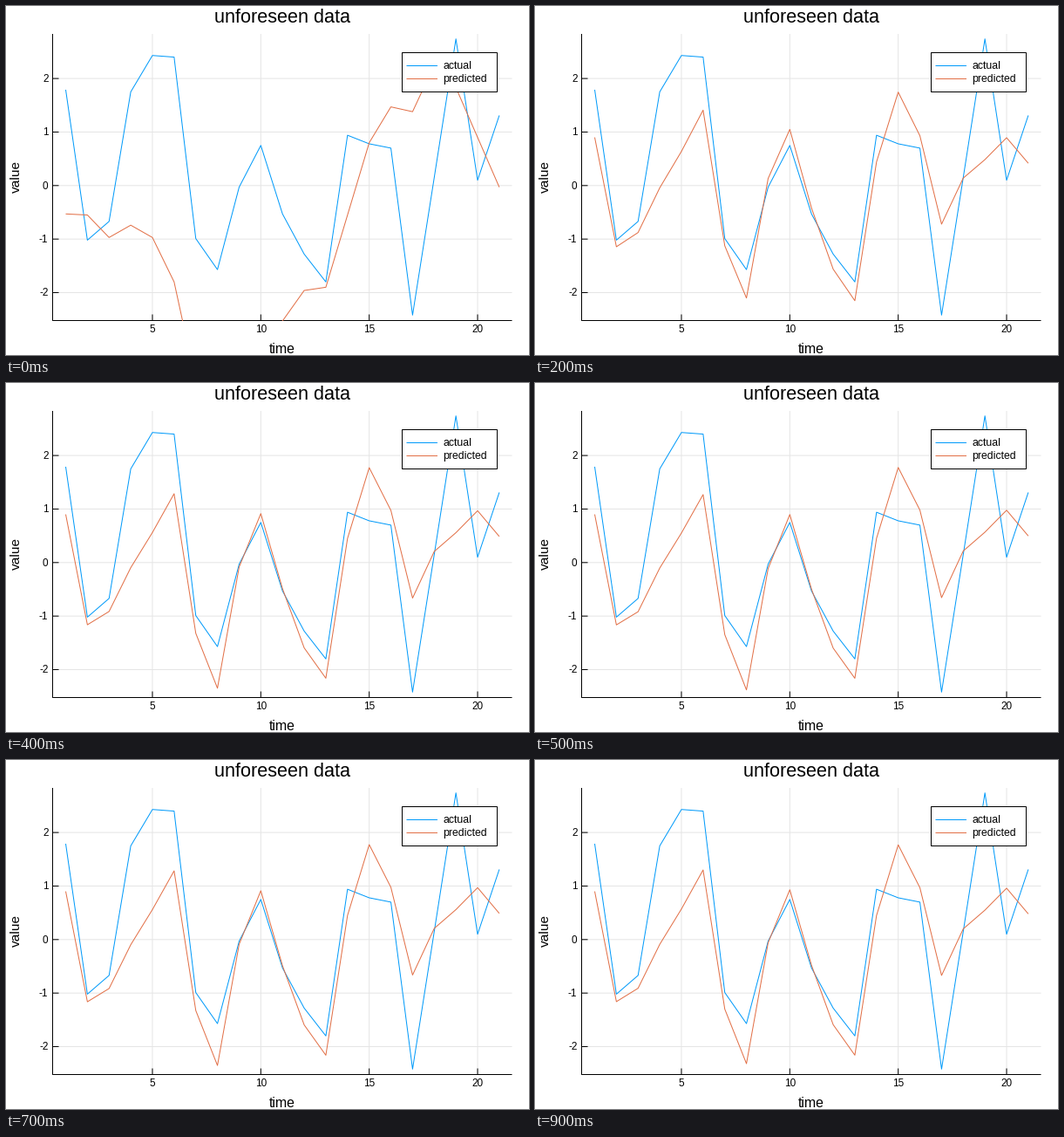
A matplotlib script that plays this animation: 600x400 px, repeating every 1000 ms.

```python
import numpy as np
import matplotlib.pyplot as plt
from matplotlib.animation import FuncAnimation
from matplotlib.patches import Rectangle

WIDTH, HEIGHT, DPI = 600, 400, 100
BLUE, ORANGE, GRID = "#009afa", "#e26f46", "#e5e5e5"
PX = 72 / DPI
LEFT, RIGHT, TOP, BOTTOM = 53, 580, 31.5, 360
ZERO_Y, UNIT_X, UNIT_Y = 205.3, 24.87, 61.35

plt.rcParams["font.family"] = "Liberation Sans"

time = np.arange(1, 22)
actual = np.array([1.79, -1.02, -0.67, 1.75, 2.43, 2.4, -0.99, -1.57, -0.03, 0.75, -0.53,
                   -1.28, -1.8, 0.94, 0.78, 0.7, -2.42, 0.15, 2.74, 0.1, 1.31])
settled = np.array([0.9, -1.16, -0.91, -0.09, 0.57, 1.3, -1.3, -2.32, -0.06, 0.93, -0.48,
                    -1.59, -2.16, 0.45, 1.77, 0.97, -0.67, 0.2, 0.55, 0.96, 0.48])
# Corner points of the first guess, before any training.
guess_points = [(1, -0.53), (2, -0.55), (3, -0.97), (4, -0.74), (5, -0.97), (6, -1.8),
                (7, -3.66), (11, -2.53), (12, -1.96), (13, -1.9), (15, 0.8), (16, 1.47),
                (17, 1.38), (18, 2.25), (19, 1.83), (21, -0.03)]


def prediction(step):
    """First guess, then a damped swing towards the settled fit."""
    if step == 0:
        return np.interp(time, *zip(*guess_points))
    n = step - 1
    swing = np.exp(-0.4 * n) * np.cos(0.6 * n)
    error = 0.28 * np.exp(-((time - 8.2) / 2) ** 2) + 0.12 * np.sin(2 * np.pi * (time - 1) / 25)
    return settled + error * swing


def to_x(t):
    return 68 + (t - 1) * UNIT_X


def to_y(value):
    return ZERO_Y - value * UNIT_Y


# Whole coordinates fall on pixel centres.
fig = plt.figure(figsize=(WIDTH / DPI, HEIGHT / DPI), dpi=DPI, facecolor="white")
ax = fig.add_axes([0, 0, 1, 1])
ax.set(xlim=(-0.5, WIDTH - 0.5), ylim=(HEIGHT - 0.5, -0.5))
ax.axis("off")
plot_area = Rectangle((LEFT, TOP), RIGHT - LEFT, BOTTOM - TOP, fill=False, ec="none")
ax.add_patch(plot_area)


def stroke(xs, ys, color="black", z=2):
    return ax.plot(xs, ys, color=color, lw=PX, zorder=z, snap=False,
                   solid_capstyle="butt", solid_joinstyle="round")[0]


def label(x, y, text, size, ha="center", **kw):
    ax.text(x, y, text, fontsize=size * PX, ha=ha, zorder=6, **{"va": "baseline", **kw})


def curve(values, color):
    line = stroke(to_x(time), to_y(values), color, z=3)
    line.set_clip_path(plot_area)
    return line


for t in range(5, 21, 5):
    x = to_x(t)
    stroke([x, x], [TOP, BOTTOM], GRID, z=1)
    stroke([x, x], [BOTTOM, BOTTOM - 7])
    label(x, 373.7, str(t), 11.8)
for v in range(-2, 3):
    y = to_y(v)
    stroke([LEFT, RIGHT], [y, y], GRID, z=1)
    stroke([LEFT, LEFT + 7], [y, y])
    label(48, y + 4, str(v), 11.8, ha="right")
stroke([LEFT, LEFT, RIGHT], [TOP, BOTTOM, BOTTOM])

label(316.6, 18.5, "unforeseen data", 21.6)
label(316, 397.6, "time", 15.9)
label(18, 195.3, "value", 15.4, ha="right", va="center", rotation=90)

curve(actual, BLUE)
predicted = curve(prediction(0), ORANGE)

ax.add_patch(Rectangle((453, 52), 109, 45, fc="white", ec="black", lw=PX, zorder=5))
for y, name, color in ((68, "actual", BLUE), (83, "predicted", ORANGE)):
    stroke([459, 494.5], [y, y], color, z=6)
    label(501, y + 4, name, 12.3, ha="left")


def update(step):
    predicted.set_ydata(to_y(prediction(step)))
    return (predicted,)


anim = FuncAnimation(fig, update, frames=10, interval=100, repeat=True, repeat_delay=0)
plt.show()
```
